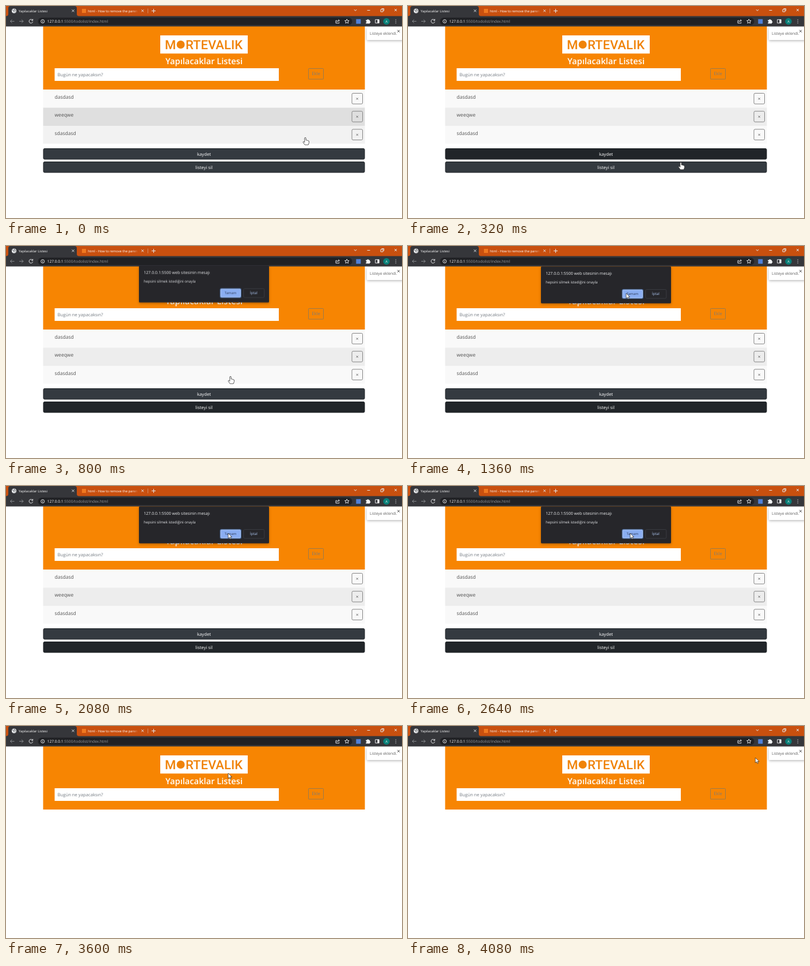
An HTML page that plays this animation: 688 by 368 pixels, repeating every 4160 ms.

```html
<!DOCTYPE html>
<html lang="tr">
<head>
<meta charset="utf-8">
<title>Yapılacaklar Listesi</title>
<style>
  html, body { margin: 0; width: 100%; height: 100%; overflow: hidden; background: #fff; }
  svg { display: block; width: 100vw; height: 100vh; }
  text { font-family: "Open Sans", "Noto Sans", sans-serif; text-rendering: geometricPrecision; }
  .mid { text-anchor: middle; }
  .line { fill: none; stroke: #e4e6e9; stroke-width: 1; }
  .dim { stroke: #85888c; }
  .item { font-size: 8.5px; fill: #505050; }
  .btn { font-size: 7.7px; font-weight: 500; fill: #fff; text-anchor: middle; }

  /* One tick is 80 ms of the 4160 ms loop, about 1.923 %. */
  .list, .row2, .row3, .save, .clear, .dialog, .hand, .arrow { animation: 4160ms step-end infinite; }
  .list { animation-name: list; }
  .row2 { animation-name: row2; }
  .row3 { animation-name: row3; }
  .save { animation-name: save; }
  .clear { animation-name: clear; }
  .dialog { animation-name: dialog; }
  .hand { animation-name: hand; }
  .arrow { animation-name: arrow; }
  .pointer { animation: move 4160ms linear infinite; }

  @keyframes list { 0% { visibility: visible } 86.53%, 100% { visibility: hidden } }
  @keyframes row2 { 0% { fill: #dfdfdf } 1.92% { fill: #e7e7e7 } 3.84%, 100% { fill: #ededed } }
  @keyframes row3 {
    0% { fill: #f2f2f2 } 1.92% { fill: #e6e6e6 } 3.84% { fill: #e8e8e8 }
    5.76% { fill: #f1f1f1 } 7.69%, 100% { fill: #f9f9f9 }
  }
  @keyframes save {
    0% { fill: #343a40 } 3.84% { fill: #2a2f34 } 5.76% { fill: #212529 }
    9.61% { fill: #2c3136 } 11.53%, 100% { fill: #343a40 }
  }
  @keyframes clear { 0% { fill: #343a40 } 9.61% { fill: #2a2f34 } 11.53%, 100% { fill: #212529 } }
  @keyframes dialog {
    0% { opacity: 0; transform: translateY(-6px) }
    15.38% { opacity: .6; transform: translateY(-6px) }
    17.3% { opacity: 1; transform: translateY(-3px) }
    19.23% { opacity: 1; transform: translateY(-1.5px) }
    21.15% { opacity: 1; transform: none }
    86.53%, 100% { opacity: 0; transform: none }
  }
  @keyframes hand { 0% { visibility: visible } 26.92%, 100% { visibility: hidden } }
  @keyframes arrow { 0% { visibility: hidden } 26.92%, 100% { visibility: visible } }
  @keyframes move {
    0% { transform: translate(520px, 228px); animation-timing-function: steps(4) }
    7.69% { transform: translate(474px, 271px); animation-timing-function: steps(2) }
    11.53% { transform: translate(468px, 274px); animation-timing-function: step-end }
    13.46% { transform: translate(468px, 274px); animation-timing-function: steps(3) }
    19.23% { transform: translate(390px, 226px); animation-timing-function: steps(4) }
    26.92% { transform: translate(318px, 92px); animation-timing-function: steps(3) }
    32.69% { transform: translate(379px, 82px); animation-timing-function: step-end }
    34.61%, 86.53% { transform: translate(386px, 82px); animation-timing-function: steps(6) }
    98.07%, 100% { transform: translate(603.5px, 55px) }
  }
</style>
</head>
<body>
<svg viewBox="0 0 688 368">
  <defs>
    <linearGradient id="fade" gradientUnits="userSpaceOnUse" x1="218" x2="231">
      <stop stop-color="#fff"/><stop offset="1" stop-color="#fff" stop-opacity="0"/>
    </linearGradient>
    <filter id="soft" x="-20%" y="-40%" width="140%" height="190%">
      <feDropShadow dx="0" dy="1.5" stdDeviation="2" flood-opacity=".28"/>
    </filter>
    <path id="x" d="M-2 -2 2 2M2 -2-2 2"/>
    <g id="del">
      <rect x="601" y="6.5" width="18.5" height="18.5" rx="2" fill="none" stroke="#858585"/>
      <path d="M608.6 14.4l3.2 3.2m0-3.2l-3.2 3.2" stroke="#666" stroke-width=".9"/>
    </g>
  </defs>
  <rect width="688" height="368" fill="#fff"/>

  <!-- page header -->
  <rect x="64.5" y="35" width="559" height="110" fill="#f78502"/>
  <rect x="268" y="51" width="152" height="31.5" fill="#fff"/>
  <g fill="#f08308" font-size="22" font-weight="500">
    <text x="276" y="75" style="font-family:Roboto,sans-serif">M</text>
    <circle cx="303.5" cy="67" r="7"/>
    <text x="411" y="75" text-anchor="end" style="font-family:Roboto,sans-serif">RTEVALIK</text>
  </g>
  <text class="mid" x="344" y="101" font-size="14.7" font-weight="600" fill="#fff">Yapılacaklar Listesi</text>
  <rect x="84.5" y="108" width="389.5" height="22" fill="#fff"/>
  <text x="89.5" y="122" font-size="7.7" fill="#747b82">Bugün ne yapacaksın?</text>
  <rect x="525.5" y="108.5" width="26" height="18.5" rx="1" fill="none" stroke="#9b7b4c"/>
  <text class="mid" x="538.6" y="120.2" font-size="7.7" fill="#857c70">Ekle</text>

  <!-- list -->
  <g class="list">
    <rect x="64.5" y="145" width="559" height="31.5" fill="#f9f9f9"/>
    <rect class="row2" x="64.5" y="176.5" width="559" height="31.5"/>
    <rect class="row3" x="64.5" y="208" width="559" height="31"/>
    <g class="item">
      <text x="84.5" y="161.3">dasdasd</text>
      <text x="84.5" y="192.4">weeqwe</text>
      <text x="84.5" y="223.8">sdasdasd</text>
    </g>
    <use href="#del" y="145"/><use href="#del" y="176.2"/><use href="#del" y="207.5"/>
    <g stroke="#202529">
      <rect class="save" x="65" y="247.5" width="558" height="18.5" rx="2"/>
      <rect class="clear" x="65" y="270.5" width="558" height="18.5" rx="2"/>
    </g>
    <text class="btn" x="344" y="259.7">kaydet</text>
    <text class="btn" x="344" y="282.7">listeyi sil</text>
  </g>

  <!-- toast -->
  <rect x="627" y="37" width="63" height="22" rx="1.5" fill="#fff" filter="url(#soft)"/>
  <text x="632" y="50.4" font-size="6.7" fill="#606060">Listeye eklendi.</text>
  <rect x="679.3" y="39" width="9" height="16" fill="#fff"/>
  <use href="#x" x="682" y="43.7" stroke="#444" stroke-width="1"/>

  <!-- browser -->
  <rect width="688" height="18" fill="#c9500f"/>
  <path d="M0 17.5Q4 17.5 4 14V4Q4 0 8 0H119Q123 0 123 4V14Q123 17.5 127 17.5H688V35.5H0Z" fill="#35363a"/>
  <circle cx="14" cy="8.5" r="4" fill="#eef0f2"/>
  <path d="M11 7l2.3.5 1 1.4-1.7 1.5M14.6 5.2l.2 1.8 2.2.6M15 10.8l1.6-1.3" fill="none" stroke="#45474b"/>
  <text x="22" y="10.6" font-size="5.75" fill="#fff">Yapılacaklar Listesi</text>
  <use href="#x" x="116.5" y="8.3" class="line"/>
  <rect x="132" y="5" width="7" height="7" fill="#f07820"/>
  <text x="142.3" y="10.6" font-size="5.8" fill="url(#fade)">html - How to remove the paren</text>
  <use href="#x" x="237.3" y="8.3" class="line"/>
  <path class="line" d="M246.5 4.5v8" opacity=".4"/>
  <path class="line" d="M253 8.5h7M256.5 5v7"/>
  <path class="line" d="M604.8 6l2.2 2.4 2.2-2.4M627.5 7.5h5M651 6h4v4h-4zM652.5 4.5h4v4"/>
  <use href="#x" x="677" y="7" class="line"/>

  <path class="line dim" d="M14.5 26.5H7.5M10.5 23.5l-3 3 3 3M23 26.5h7M27 23.5l3 3-3 3"/>
  <path class="line" d="M46 24.4A3.3 3.3 0 1 0 46.6 27.3M46.6 22.7v2.4h-2.5" stroke-width="1.2"/>
  <rect x="55.5" y="20.3" width="546" height="12.8" rx="6.4" fill="#202124"/>
  <circle cx="63.7" cy="26.6" r="3" class="line" stroke-width=".8"/>
  <path class="line" d="M63.7 26.2v2M63.7 24.6v.8" stroke-width=".8"/>
  <text x="71.7" y="29" font-size="6.6" fill="#999da2"><tspan fill="#fff">127.0.0.1</tspan>:5500/todolist/index.html</text>
  <path class="line" d="M575 25.3h-2v4.5h5.8v-1.6M574.8 28q.4-2.8 4-2.8M577.4 23.2l2 2-2 2" stroke-width=".8"/>
  <path class="line" d="M592.3 22.8l1.1 2.5 2.7.2-2.1 1.8.7 2.7-2.4-1.4-2.4 1.4.7-2.7-2.1-1.8 2.7-.2z" stroke-width=".8"/>
  <rect x="608.3" y="22.8" width="8" height="8" fill="#4f80d8"/>
  <path d="M625.3 24.3h2.2a1.3 1.3 0 0 1 2.6 0h2v2.2a1.3 1.3 0 0 1 0 2.6v1.5h-6.8v-2a1.2 1.2 0 0 0 0-2.4z" fill="#f1f3f4"/>
  <path class="line" d="M641.7 23.6h6.4v6h-6.4z"/>
  <rect x="645.3" y="23.6" width="3" height="6" fill="#f1f3f4"/>
  <circle cx="661" cy="26.7" r="5.7" fill="#087f78"/>
  <text class="mid" x="661" y="28.8" font-size="5.8" fill="#e5f2f0">A</text>
  <path class="line" d="M677.2 23.3v7" stroke-width="1.3" stroke-dasharray="1.3 1.5"/>

  <!-- confirm box -->
  <g class="dialog">
    <rect x="231" y="35.5" width="226" height="64" rx="1.5" fill="#25262a" filter="url(#soft)"/>
    <text x="239.3" y="50.2" font-size="7" fill="#eceef0">127.0.0.1:5500 web sitesinin mesajı</text>
    <text x="239.3" y="64.5" font-size="6.25" fill="#e3e5e8">hepsini silmek istediğini onayla</text>
    <rect x="371.5" y="74.7" width="37.5" height="17" rx="2.5" fill="#40608f"/>
    <rect x="373" y="76.2" width="34.5" height="14" rx="1.5" fill="#8aaef2" stroke="#bfd3fa" stroke-width=".8"/>
    <text class="mid" x="390" y="85.4" font-size="5.9" fill="#2d3b59">Tamam</text>
    <rect x="412.8" y="75.5" width="36" height="15.5" rx="2" fill="none" stroke="#393b40"/>
    <text class="mid" x="430.4" y="85.4" font-size="6.2" font-weight="500" fill="#b3cdfa">İptal</text>
  </g>

  <!-- mouse -->
  <g class="pointer" fill="#fff" stroke-linejoin="round">
    <path class="hand" d="M-1.2 1Q0 -.6 1.1 1V5Q2.4 4.3 3.1 5.4 4.4 4.8 4.9 6 6.3 5.6 6.4 7V9.5L5.2 13H-.8L-3.8 8.7Q-4 7 -2.5 7.5L-1.2 8.8Z" stroke="#333" stroke-width=".8"/>
    <path class="arrow" d="M0 0V9L2.1 7.1 3.5 10.2 5 9.5 3.7 6.5H6.5Z" stroke="#222" stroke-width=".7"/>
  </g>
</svg>
</body>
</html>
```
